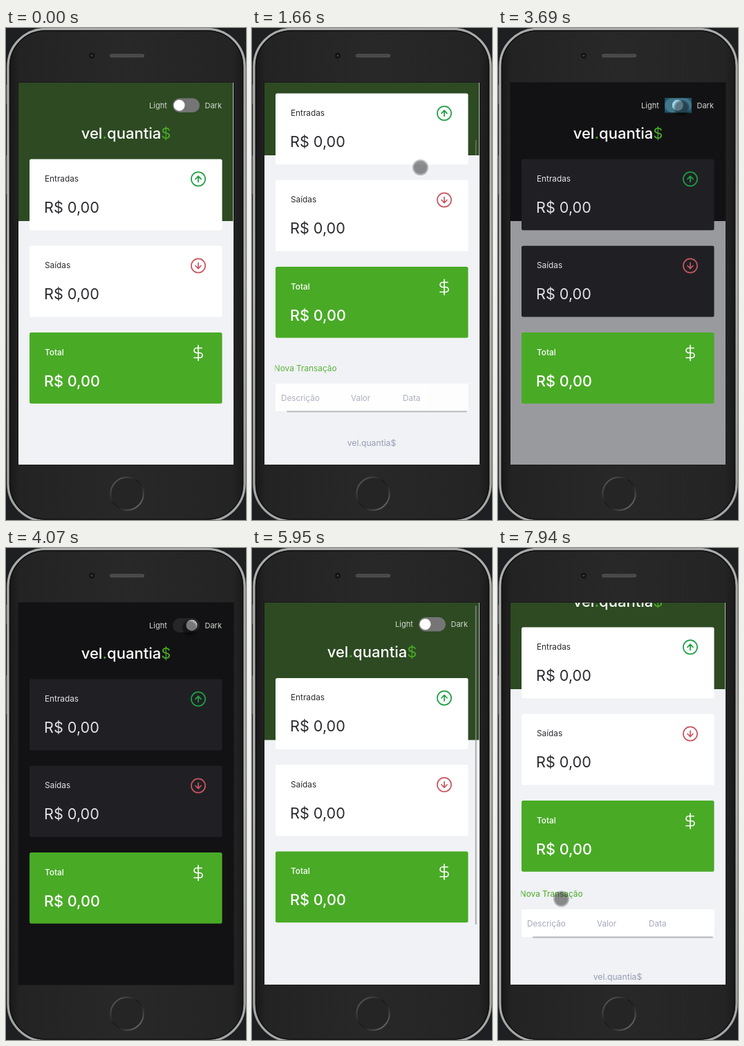
Write an HTML page that moves like this. It is 347 px wide and 711 px high and loops after 8 s.

```html
<!DOCTYPE html>
<html lang="pt-BR">
<head>
<meta charset="utf-8">
<title>Controle financeiro</title>
<style>
  html, body { margin: 0; width: 100%; height: 100%; overflow: hidden; background: #1e1f20; }
  svg { display: block; width: 347px; height: 711px; font-family: Inter, "Open Sans", sans-serif; }
  .label { font-size: 11.8px; }
  .amount { font-size: 21.6px; }
  .strong { font-weight: 500; }
  .icon { fill: none; stroke-width: 1.7; stroke-linecap: round; stroke-linejoin: round; }
</style>
</head>
<body>
<svg viewBox="0 0 347 711">
  <defs>
    <linearGradient id="metal" x2="0" y2="1">
      <stop offset="0" stop-color="#a9abab"/><stop offset=".5" stop-color="#b9bbbb"/><stop offset="1" stop-color="#a2a4a4"/>
    </linearGradient>
    <linearGradient id="body">
      <stop offset="0" stop-color="#171717"/><stop offset=".05" stop-color="#232323"/>
      <stop offset=".5" stop-color="#282828"/><stop offset=".95" stop-color="#242424"/><stop offset="1" stop-color="#191919"/>
    </linearGradient>
    <linearGradient id="ring" x2="1" y2="1">
      <stop offset="0" stop-color="#6b6b6b"/><stop offset=".45" stop-color="#1b1b1b"/>
      <stop offset=".6" stop-color="#222"/><stop offset="1" stop-color="#858585"/>
    </linearGradient>
    <clipPath id="screen"><rect x="18" y="79" width="311" height="552"/></clipPath>
    <clipPath id="column"><rect x="33.5" y="500" width="279.5" height="300"/></clipPath>
  </defs>

  <g id="phone">
    <rect width="347" height="711" fill="#1e1f20"/>
    <path d="M0 82h2v28H0zM0 127h2v0M0 184h2v56H0z" fill="#4b4c4c"/>
    <rect x="3" y="1.5" width="342" height="711" rx="54" fill="url(#body)" stroke="url(#metal)" stroke-width="3.4"/>
    <rect x="5.5" y="4" width="337" height="706" rx="51" fill="none" stroke="#101010" stroke-width="1.4"/>
    <rect x="150" y="37.5" width="50" height="5" rx="2.5" fill="#505050"/>
    <path d="M152 40h46" stroke="#3c3c3c" stroke-width="2" stroke-dasharray="1 1"/>
    <circle cx="124" cy="40" r="4.2" fill="#141414"/>
    <circle cx="124" cy="40" r="1.3" fill="#4b4c50"/>
    <circle cx="175" cy="673" r="23.7" fill="#252525" stroke="url(#ring)" stroke-width="2"/>
    <rect x="17.5" y="78.5" width="312" height="553" fill="#111"/>
  </g>

  <g clip-path="url(#screen)">
    <rect id="page" x="18" y="79" width="311" height="552"/>
    <g id="content">
      <rect id="header" x="18" y="79" width="310.3" height="200"/>
      <g font-size="11" fill="#d3d9d1">
        <text x="207" y="116">Light</text>
        <text x="287.5" y="116">Dark</text>
      </g>
      <rect id="track" x="241" y="101.5" width="39" height="20.5" rx="10.2"/>
      <circle id="knob" cy="111.7" r="8"/>
      <rect id="tap" x="241" y="101" width="39" height="21.5" fill="#33b5e5" fill-opacity=".4"/>
      <text x="173.5" y="160" font-size="22" class="strong" text-anchor="middle" fill="#fff">vel<tspan fill="#49aa26">.</tspan>quantia<tspan fill="#49aa26" font-weight="400">$</tspan></text>
      <g id="cards"></g>
      <g clip-path="url(#column)">
        <g id="reveal">
          <text x="122.5" y="579" font-size="11.8" text-anchor="end" fill="#49aa26">Nova Transação</text>
          <g transform="translate(0 597)">
            <rect x="34" width="279" height="40" fill="#fff"/>
            <g font-size="11.7" fill="#a3a8bb">
              <text x="42" y="25">Descrição</text>
              <text x="143" y="25">Valor</text>
              <text x="218" y="25">Data</text>
            </g>
            <rect x="50" y="39.5" width="261" height="2" rx="1" fill="#b4b5b7"/>
          </g>
        </g>
      </g>
      <text x="173" y="699" font-size="12.2" text-anchor="middle" fill="#969cb3">vel.quantia$</text>
    </g>
    <rect id="thumb" x="322.8" width="1.8" rx=".9" fill="#8f948f"/>
  </g>
  <g id="pointer">
    <circle r="11.5" fill="#000" fill-opacity=".26"/>
    <circle r="9.5" fill="#000" fill-opacity=".24"/>
  </g>
</svg>
<script>
const LOOP = 8000;
const REVEAL_MS = 1820;
const $ = id => document.getElementById(id);
const set = (id, attrs) => {
  for (const name in attrs) $(id).setAttribute(name, attrs[name]);
};

const arrow = (dir, color) =>
  `<g class="icon" stroke="${color}" transform="translate(278 28.8) scale(1 ${dir})">
    <circle r="10.1"/><path d="M0 4.2V-4.2M-4 0L0-4.2L4 0"/></g>`;
const dollar =
  `<path class="icon" stroke="#fff" transform="translate(266 17.5)"
    d="M12 1v22M17 5H9.5a3.5 3.5 0 0 0 0 7h5a3.5 3.5 0 0 1 0 7H6"/>`;

const card = (y, title, icon, total) =>
  `<g transform="translate(0 ${y})" class="${total ? 'strong' : 'plain'}" fill="#fff">
    <rect x="34" width="278.5" height="102.8" rx="2.5" ${total ? 'fill="#49aa26"' : 'class="panel"'}/>
    <text class="label" x="56" y="32.5">${title}</text>
    <text class="amount" x="55" y="77.5">R$ 0,00</text>${icon}</g>`;

$('cards').innerHTML =
  card(189.5, 'Entradas', arrow(1, '#1f9f45'), false) +
  card(314.7, 'Saídas', arrow(-1, '#c9555f'), false) +
  card(440, 'Total', dollar, true);

const clamp = x => Math.min(1, Math.max(0, x));
const mix = (a, b, k) => a + (b - a) * k;
const mixColor = (a, b, k) => `rgb(${a.map((v, i) => Math.round(mix(v, b[i], k)))})`;
const progress = (t, start, length) => clamp((t - start) / length);
const bezier = (a, b, s) => 3 * a * s * (1 - s) ** 2 + 3 * b * s * s * (1 - s) + s ** 3;

// CSS "ease": cubic-bezier(.25, .1, .25, 1)
function ease(p) {
  let low = 0, high = 1;
  for (let i = 0; i < 24; i++) {
    const mid = (low + high) / 2;
    if (bezier(.25, .25, mid) < p) low = mid; else high = mid;
  }
  return p <= 0 ? 0 : p >= 1 ? 1 : bezier(.1, 1, low);
}
const eased = (t, start, length) => ease(progress(t, start, length));

const scrollAt = t =>
  95 * (eased(t, 490, 600) - eased(t, 2210, 430)) + 75 * eased(t, 5930, 600);

function revealAt(t) {
  if (t < 2660) return eased(t, 577, REVEAL_MS);
  if (t < 5900) return 1 - eased(t, 2660, REVEAL_MS);
  return eased(t, 5900, REVEAL_MS);
}

function pointerAt(t) {
  if (t >= 500 && t < 5950) {
    const k = eased(t, 3060, 420);
    return [mix(243.5, 265.5, k), mix(201.5, 115.5, k)];
  }
  return t >= 7640 ? [91.5, 507] : null;
}

function draw(t) {
  const scroll = scrollAt(t), shown = revealAt(t), pointer = pointerAt(t);
  const dark = t >= 3570 && t < 5080;
  const night = eased(t, 3570, 500) - eased(t, 5080, 500);
  const knob = eased(t, 3570, 400) - eased(t, 5080, 400);

  set('page', { fill: mixColor([240, 242, 245], [18, 18, 20], night) });
  set('header', { fill: dark ? '#121214' : '#2d4a22', width: dark ? 311 : 310.3 });
  set('content', { transform: `translate(0 ${-scroll})` });
  set('track', { fill: mixColor([117, 117, 117], [38, 38, 41], knob) });
  set('knob', { cx: mix(250.5, 268.5, knob), fill: mixColor([255, 255, 255], [212, 212, 212], knob) });
  const tapped = (t >= 3570 && t < 3800) || (t >= 5080 && t < 5310);
  set('tap', { visibility: tapped ? 'visible' : 'hidden' });

  for (const group of document.querySelectorAll('.plain')) {
    group.setAttribute('fill', dark ? '#e1e1e6' : '#2b2c31');
    group.querySelector('.panel').setAttribute('fill', dark ? '#202024' : '#fff');
  }

  set('reveal', { transform: `translate(0 ${100 * (1 - shown)})`, opacity: shown });

  const scrolling = (t >= 500 && t < 1280) || (t >= 2220 && t < 3300) || (t >= 5950 && t < 6640);
  const residue = t >= 1280 && t < 2220;
  set('thumb', {
    y: 82 + scroll * .84,
    height: residue ? 22 : 461,
    opacity: scrolling ? .8 : residue ? .55 : 0
  });

  set('pointer', {
    visibility: pointer ? 'visible' : 'hidden',
    transform: `translate(${pointer || [0, 0]})`
  });
}

const began = performance.now();
function tick() {
  draw((performance.now() - began) % LOOP);
  requestAnimationFrame(tick);
}
tick();
</script>
</body>
</html>
```
